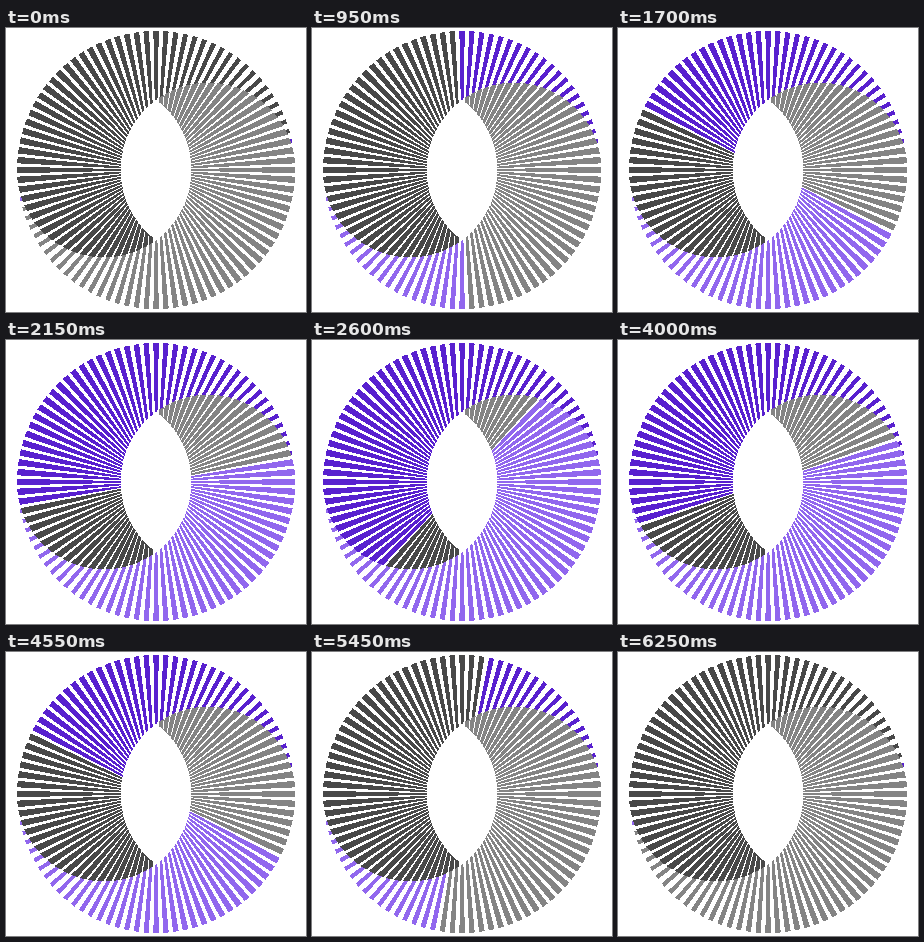
Recreate the animation shown at these times as an HTML page. Size 300 by 284 pixels, loop 6.3 s.

```html
<!DOCTYPE html>
<html lang="en">
<head>
<meta charset="utf-8">
<title>Ray eye</title>
<style>
  html, body { margin: 0; width: 100%; height: 100%; overflow: hidden; background: #fff; }
  svg { display: block; width: 100vw; height: 100vh; shape-rendering: crispEdges; }
</style>
</head>
<body>
<svg id="stage" viewBox="0 0 300 284"></svg>
<script>
const SVG = 'http://www.w3.org/2000/svg';
const STEP_MS = 50, STEPS = 126;
const SPOKES = 88, FIRST = 3, COUNT = 63;
const CX = 150.1, CY = 142;
const RADIUS = 139;       // outer disc
const LOBE = 87.3;        // two overlapping circles whose overlap is the eye
const OFFSET = 52;        // lobe centres left and right of the middle
const MEAN_WIDTH = 4.1;   // width of every spoke halfway along its length

const halves = [
  { turn: 0, idle: '#484848', lit: '#5820cf' },
  { turn: 180, idle: '#848484', lit: '#9167ee' }
];

// Distance from the middle to the edge of the right lobe along an angle.
const lobeEdge = a =>
  OFFSET * Math.cos(a) + Math.sqrt(LOBE ** 2 - (OFFSET * Math.sin(a)) ** 2);

const point = (r, a) => `${(r * Math.cos(a)).toFixed(2)},${(-r * Math.sin(a)).toFixed(2)}`;

function spokePoints(index) {
  const angle = index * 2 * Math.PI / SPOKES;
  const outer = a => index <= SPOKES / 2 ? RADIUS : Math.min(RADIUS, lobeEdge(a + Math.PI));
  const spread = MEAN_WIDTH / (lobeEdge(angle) + outer(angle));
  const a = angle - spread, b = angle + spread;
  return [
    point(lobeEdge(a), a), point(outer(a), a),
    point(outer(angle), angle),
    point(outer(b), b), point(lobeEdge(b), b),
    point(lobeEdge(angle), angle)
  ].join(' ');
}

function add(parent, name, attrs) {
  const node = document.createElementNS(SVG, name);
  for (const key in attrs) node.setAttribute(key, attrs[key]);
  return parent.appendChild(node);
}

const stage = document.getElementById('stage');
for (const half of halves) {
  const group = add(stage, 'g', { transform: `translate(${CX} ${CY}) rotate(${half.turn})` });
  half.spokes = Array.from({ length: COUNT }, (_, i) =>
    add(group, 'polygon', { points: spokePoints(FIRST + i) }));
}

// The colour runs along both halves one spoke per step, then retreats.
function draw(time) {
  const step = Math.floor(time / STEP_MS) % STEPS;
  const last = Math.min(step, STEPS - 1 - step);
  for (const { spokes, idle, lit } of halves)
    spokes.forEach((spoke, i) => spoke.setAttribute('fill', i <= last ? lit : idle));
}

const start = performance.now();
function tick() {
  draw(performance.now() - start);
  requestAnimationFrame(tick);
}
tick();
</script>
</body>
</html>
```
